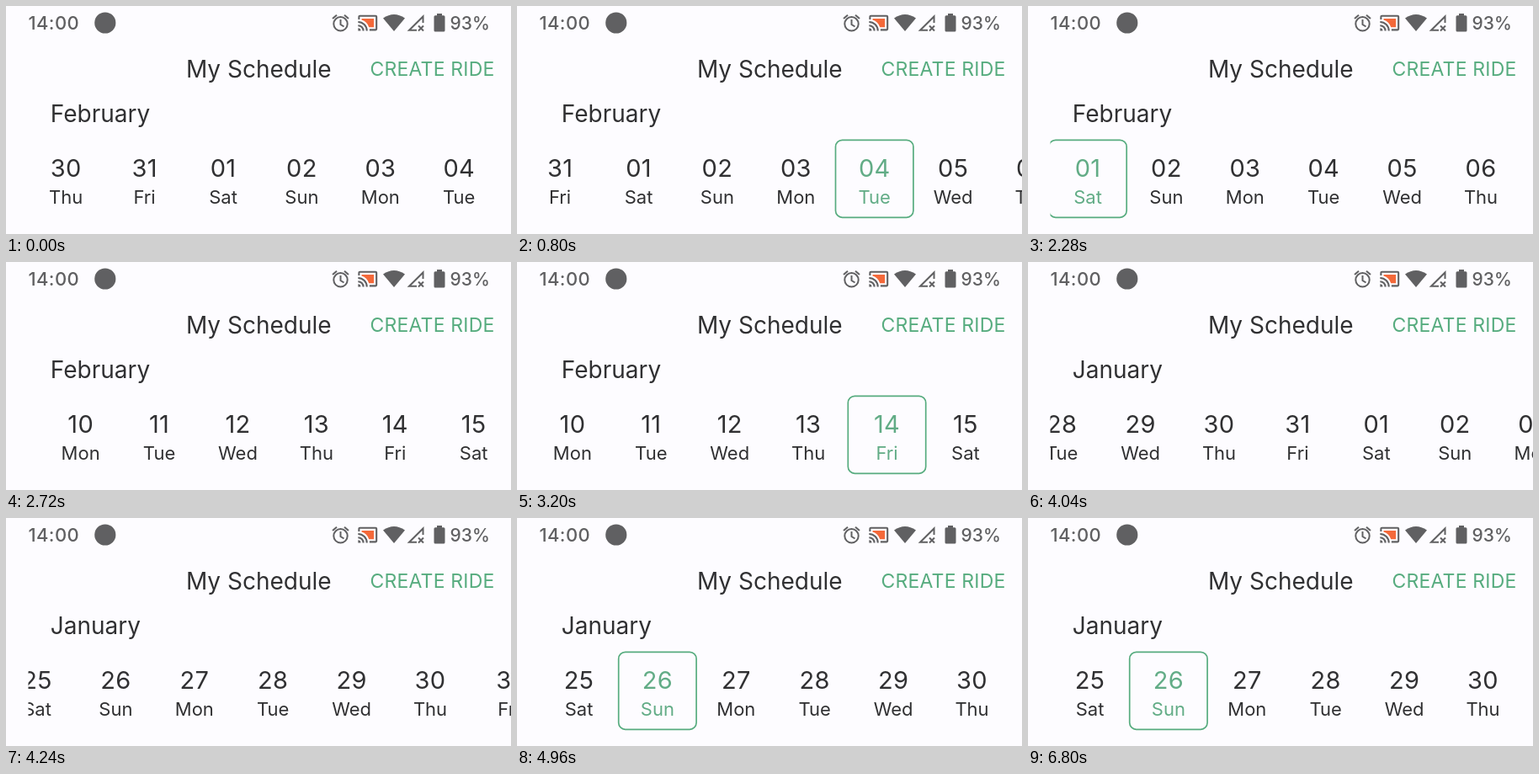
An HTML page for the animation above (6.88 s loop, 600 by 271 pixels).

```html
<!DOCTYPE html>
<html lang="en">
<head>
<meta charset="utf-8">
<title>My Schedule</title>
<style>
  html, body { margin: 0; width: 100%; height: 100%; overflow: hidden; background: #fdfcff; }
  svg { display: block; width: 100%; height: 100%; font-family: Inter, Roboto, sans-serif; fill: #303032; }
  .status { fill: #606062; }
  .status text { font-weight: 500; }
  .clock { font-size: 22px; letter-spacing: .4px; }
  .charge { font-size: 21px; }
  .line { fill: none; stroke: #606062; stroke-width: 2; }
  .title, .month { font-size: 28px; }
  .action { font-size: 23px; letter-spacing: .2px; fill: #57ac7f; }
  .num { font-size: 29px; letter-spacing: .3px; }
  .day { font-size: 22px; }
  .num, .day, .title, .action { text-anchor: middle; }
  .cell rect { fill: none; stroke: #57ac7f; stroke-width: 1.7; visibility: hidden; }
  .cell.on { fill: #62ac86; }
  .cell.on rect { visibility: visible; }
</style>
</head>
<body>
<svg viewBox="0 0 600 271">
  <clipPath id="strip"><rect x="26.5" y="150" width="573.5" height="121"/></clipPath>

  <g class="status">
    <text class="clock" x="26.5" y="28">14:00</text>
    <circle cx="117.8" cy="20" r="12.6"/>
    <g class="line">
      <circle cx="397.5" cy="21.3" r="8.2"/>
      <path d="M397.5 16v6l4 2.5M388 15l5-4.3M407 15l-5-4.3"/>
    </g>
    <g transform="translate(417.3 7.6) scale(1.04)">
      <path fill="#f4693a" d="M5 7h14v10h-5.6A13 13 0 0 0 5 8.6z"/>
      <path d="M21 3H3a2 2 0 0 0-2 2v3h2V5h18v14h-7v2h7a2 2 0 0 0 2-2V5a2 2 0 0 0-2-2z
        M1 18v3h3a3 3 0 0 0-3-3z M1 14v2a5 5 0 0 1 5 5h2a7 7 0 0 0-7-7z
        M1 10v2a9 9 0 0 1 9 9h2A11 11 0 0 0 1 10z"/>
    </g>
    <path d="M448 14.5Q461 5.5 474 14.5L461 30z"/>
    <path class="line" d="M495.5 20V12.5L479 28.8H488"/>
    <path class="line" d="M490 23.5l6 6m0-6l-6 6"/>
    <path d="M512 9h6v2.2h2a1.5 1.5 0 0 1 1.5 1.5V29a1.5 1.5 0 0 1-1.5 1.5h-10a1.5 1.5 0 0 1-1.5-1.5V12.7a1.5 1.5 0 0 1 1.5-1.5h2z"/>
    <text class="charge" x="527.5" y="28">93%</text>
  </g>

  <text class="title" x="300.3" y="84.6">My Schedule</text>
  <text class="action" x="506.5" y="83">CREATE RIDE</text>
  <text class="month" id="month" x="52.8" y="137.6">February</text>
  <g clip-path="url(#strip)"><g id="days"></g></g>
</svg>
<script>
const LOOP = 6880, FRAME = 40, PITCH = 93.4, FIRST_X = 73.5, COUNT = 24;
const DAYS = ['Sat', 'Sun', 'Mon', 'Tue', 'Wed', 'Thu', 'Fri'];
const days = document.getElementById('days');
const month = document.getElementById('month');

// The strip starts on Saturday 25 January
const dateOf = i => i < 7 ? 25 + i : i - 6;
days.innerHTML = Array.from({ length: COUNT }, (_, i) => `
  <g class="cell" transform="translate(${FIRST_X + i * PITCH} 0)">
    <rect x="-46.2" y="159.3" width="92.4" height="92" rx="8"/>
    <text class="num" y="203">${String(dateOf(i)).padStart(2, '0')}</text>
    <text class="day" y="234.5">${DAYS[i % 7]}</text>
  </g>`).join('');
const cells = [...days.children];

const clamp = (v, lo, hi) => Math.min(hi, Math.max(lo, v));

function fling(t, start, length, from, to) {
  const left = 1 - clamp((t - start) / length, 0, 1);
  return to + (from - to) * left ** 2.64;
}

function scrollAt(t) {
  if (t < 2240) return fling(t, 0, 260, 469.3, 582.8);
  if (t < 2280) return 582.8 + 73.5 * (t - 2240) / 40;
  if (t <= 3600) return fling(t, 2280, 590, 656.3, 1502);
  // Slowing swipe back that stops hard at the start of the list
  const d = t - 4040;
  return t >= 4300 ? 0 : clamp(313.5 - 1.805 * d + 0.0021 * d * d, 0, 1502);
}

function selectedAt(t) {
  if (t < 800) return -1;
  if (t < 1720) return 10;
  if (t < 3160) return 7;
  return t < 4960 ? 20 : 1;
}

function draw(now) {
  const t = Math.floor(now % LOOP / FRAME) * FRAME;
  const x = scrollAt(t), selected = selectedAt(t);
  days.setAttribute('transform', `translate(${-x} 0)`);
  cells.forEach((cell, i) => cell.classList.toggle('on', i === selected));
  const middle = Math.round((313 + x - FIRST_X) / PITCH);
  month.textContent = middle < 7 ? 'January' : 'February';
}

let origin;
function tick(now) {
  origin ??= now;
  draw(now - origin);
  requestAnimationFrame(tick);
}
draw(0);
requestAnimationFrame(tick);
</script>
</body>
</html>
```
